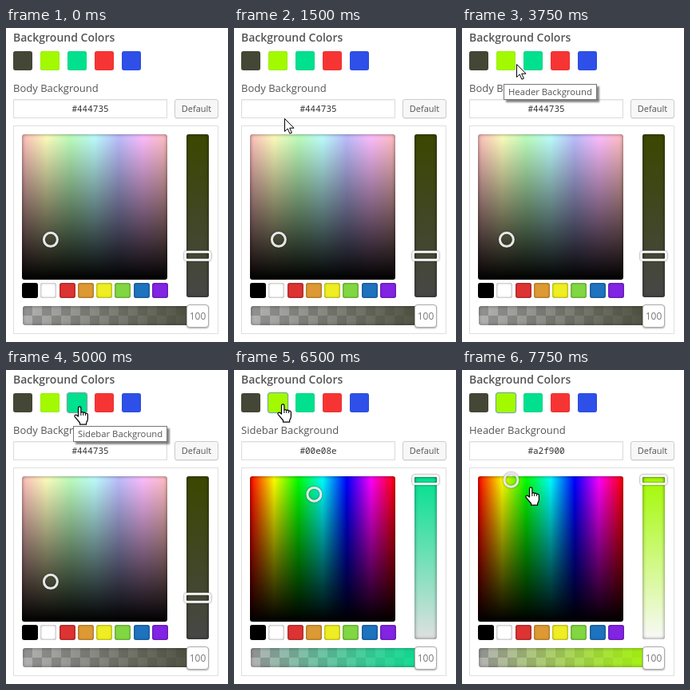
Recreate the animation shown at these times as an HTML page. Size 278 by 393 pixels, loop 8 s.

```html
<!DOCTYPE html>
<html lang="en">
<head>
<meta charset="utf-8">
<title>Background colors</title>
<style>
html, body { margin: 0; width: 100%; height: 100%; overflow: hidden; background: #fff; }
#stage {
  position: relative; width: 278px; height: 393px; overflow: hidden;
  font: 13px/18px "Open Sans", sans-serif; color: #555;
}
#stage * { position: absolute; box-sizing: border-box; white-space: nowrap; }
h1 { left: 9px; top: 2px; margin: 0; font-size: 14px; line-height: 20px; font-weight: 600; }
#label { left: 9px; top: 66px; }
.swatch { top: 29px; width: 24px; height: 24px; border-radius: 3px; box-shadow: inset 0 0 1px #0006; }
.swatch.on { box-shadow: 0 0 0 1px #78a79a, 0 0 2px 1px #5b9dd999; }
#hex, #reset { top: 89px; height: 24px; line-height: 22px; font-size: 11px; text-align: center; }
#hex {
  left: 9px; width: 193px; border: 1px solid #ddd; box-shadow: inset 0 1px 2px #0001;
  color: #333; font-family: "Noto Sans Mono", monospace;
}
#reset {
  left: 211px; width: 55px; border: 1px solid #ccc; border-radius: 3px;
  background: #f7f7f7; box-shadow: 0 1px 0 #0001;
}
#panel { left: 9px; top: 122px; width: 257px; height: 261px; border: 1px solid #dfdfdf; }
#square, #strip { top: 133px; border-radius: 3px; box-shadow: inset 0 0 4px #0008; }
#square { left: 20px; width: 182px; height: 182px; }
#strip { left: 226px; width: 28px; height: 204px; }
#ball { width: 20px; height: 20px; border: 3px solid #e6e6e6; border-radius: 50%; box-shadow: 0 0 2px #000a, inset 0 0 2px #000a; }
#knob { left: 223px; width: 34px; height: 13px; border: 3px solid #f4f4f4; border-radius: 4px; box-shadow: 0 0 2px #000b, inset 0 0 2px #000a; }
.preset { top: 319px; width: 20px; height: 19px; border-radius: 3px; box-shadow: inset 0 0 3px #0008; }
#alpha { left: 21px; top: 348px; width: 233px; height: 24px; border-radius: 3px; box-shadow: inset 0 0 4px #0006; }
#alphaKnob {
  left: 226px; top: 346px; width: 28px; height: 29px; line-height: 27px; text-align: center; font-size: 12px;
  color: #777; background: #fff; border: 1px solid #aaa; border-radius: 4px; box-shadow: 0 1px 2px #0005;
}
#tip {
  top: 70px; height: 20px; padding: 0 5px; border: 1px solid #777; background: #fff;
  box-shadow: 3px 3px 2px #0007; font-size: 11.3px; line-height: 18px;
}
svg { left: 0; top: 0; overflow: visible; fill: #fff; stroke: #000; stroke-linejoin: round; }
</style>
</head>
<body>
<div id="stage">
  <h1>Background Colors</h1>
  <div id="label"></div>
  <div id="hex"></div>
  <div id="reset">Default</div>
  <div id="panel"></div>
  <div id="square"></div>
  <div id="ball"></div>
  <div id="strip"></div>
  <div id="knob"></div>
  <div id="alpha"></div>
  <div id="alphaKnob">100</div>
  <div id="tip"></div>
  <svg id="arrow" width="14" height="21"><path d="M.5.5V16.5l3.7-3.5 2.7 6.2 2.5-1.1-2.7-5.9H12z"/></svg>
  <svg id="hand" width="19" height="24">
    <path stroke-width="1.2" d="M5.5 13V2.6a1.7 1.7 0 0 1 3.4 0V8q1.7-1 2.9.5 1.7-.8 2.8.7 2.8-.4 2.8 2V16q0 2.5-1.8 5v2.2H7.5V21L1.2 13.6q-.9-1.8.8-2.4 1.5-.2 3.5 1.8z"/>
    <path d="M8.9 8v4M11.8 8.5V12M14.6 9.2V12" fill="none"/>
  </svg>
</div>
<script>
const $ = id => document.getElementById(id);
const stage = $("stage");
const LOOP = 8000;

const themes = {
  Body: { hex: "#444735", rgb: [68, 71, 53] },
  Header: { hex: "#a2f900", rgb: [162, 249, 0] },
  Sidebar: { hex: "#00e08e", rgb: [0, 224, 142] }
};

function addBoxes(cls, colors, left, gap) {
  return colors.map((color, i) => {
    const box = document.createElement("div");
    box.className = cls;
    box.style.left = Math.round(left + i * gap) + "px";
    box.style.background = color;
    stage.insertBefore(box, $("tip"));
    return box;
  });
}
const swatches = addBoxes("swatch", ["#444735", "#a2f900", "#00e08e", "#f73434", "#2e50e8"], 9, 34);
addBoxes("preset", ["#000", "#fff", "#d33", "#d93", "#ee2", "#81d742", "#1e73be", "#8224e3"], 20, 23.25);

// Time, pointer kind, hot spot
const moves = [
  [0, ""],
  [500, "arrow", 147, 373], [750, "arrow", 116, 290], [1000, "arrow", 80, 205],
  [1250, "arrow", 50, 136], [1500, "arrow", 63, 113], [1750, "arrow", 65, 87],
  [2000, "arrow", 60, 62], [2250, "hand", 55, 43], [2750, "arrow", 67, 60],
  [3250, "hand", 60, 47], [3500, "hand", 55, 46], [3750, "arrow", 68, 45],
  [4000, "arrow", 71, 61], [4250, "arrow", 76, 76],
  [4750, "hand", 86, 50], [5000, "hand", 92, 46],
  [5750, "hand", 89, 49], [6000, "arrow", 71, 54], [6250, "hand", 64, 47],
  [6500, "hand", 61, 43], [6750, "hand", 63, 48],
  [7500, "hand", 73, 99], [7750, "hand", 86, 147]
];
const picks = [[0, "Body"], [5250, "Sidebar"], [7250, "Header"]];
const tips = [[0, ""], [3500, "Header", 52], [4000, ""], [5000, "Sidebar", 84], [5750, ""]];
const rings = [[0, -1], [5000, 2], [6500, 1]];

const at = (list, t) => list.findLast(step => step[0] <= t);
const place = (el, x, y) => el.style.transform = `translate(${x}px, ${y}px)`;

function hsv([r, g, b]) {
  const max = Math.max(r, g, b), d = max - Math.min(r, g, b);
  const h = max === r ? (g - b) / d : max === g ? 2 + (b - r) / d : 4 + (r - g) / d;
  return [h * 60, d / max, max / 255];
}

function css(h, s, v) {
  const f = n => {
    const k = (n + h / 60) % 6;
    return Math.round(255 * v * (1 - s * Math.max(0, Math.min(k, 4 - k, 1))));
  };
  return `rgb(${f(5)},${f(3)},${f(1)})`;
}

let shown;
function showTheme(name) {
  if (name === shown) return;
  shown = name;
  const { hex, rgb } = themes[name];
  const [h, s, v] = hsv(rgb);
  const hues = [0, 60, 120, 180, 240, 300, 360].map(a => css(a, s, 1));
  $("label").textContent = name + " Background";
  $("hex").textContent = hex;
  $("square").style.background =
    `linear-gradient(#0000, #000), linear-gradient(90deg, ${hues})`;
  $("strip").style.background = `linear-gradient(${css(h, 1, v)}, ${css(h, 0, v)})`;
  $("alpha").style.background =
    `linear-gradient(90deg, rgba(${rgb},0), ${hex}),
     repeating-conic-gradient(#b2b2b2 0 25%, #929292 0 50%) 0 0 / 24px 24px`;
  place($("ball"), 10.5 + h / 360 * 182, 123.5 + (1 - v) * 182);
  place($("knob"), 0, 131 + (1 - s) * 198);
}

function draw(t) {
  showTheme(at(picks, t)[1]);

  const [, kind, x, y] = at(moves, t);
  for (const id of ["arrow", "hand"]) $(id).style.display = id === kind ? "block" : "none";
  if (kind === "arrow") place($("arrow"), x, y);
  if (kind === "hand") place($("hand"), x - 7, y - 1);

  const [, name, left] = at(tips, t);
  $("tip").style.display = name ? "block" : "none";
  if (name) {
    $("tip").textContent = name + " Background";
    $("tip").style.left = left + "px";
  }

  const ring = at(rings, t)[1];
  swatches.forEach((box, i) => box.classList.toggle("on", i === ring));
}

const start = performance.now();
function tick() {
  draw((performance.now() - start) % LOOP);
  requestAnimationFrame(tick);
}
tick();
</script>
</body>
</html>
```
